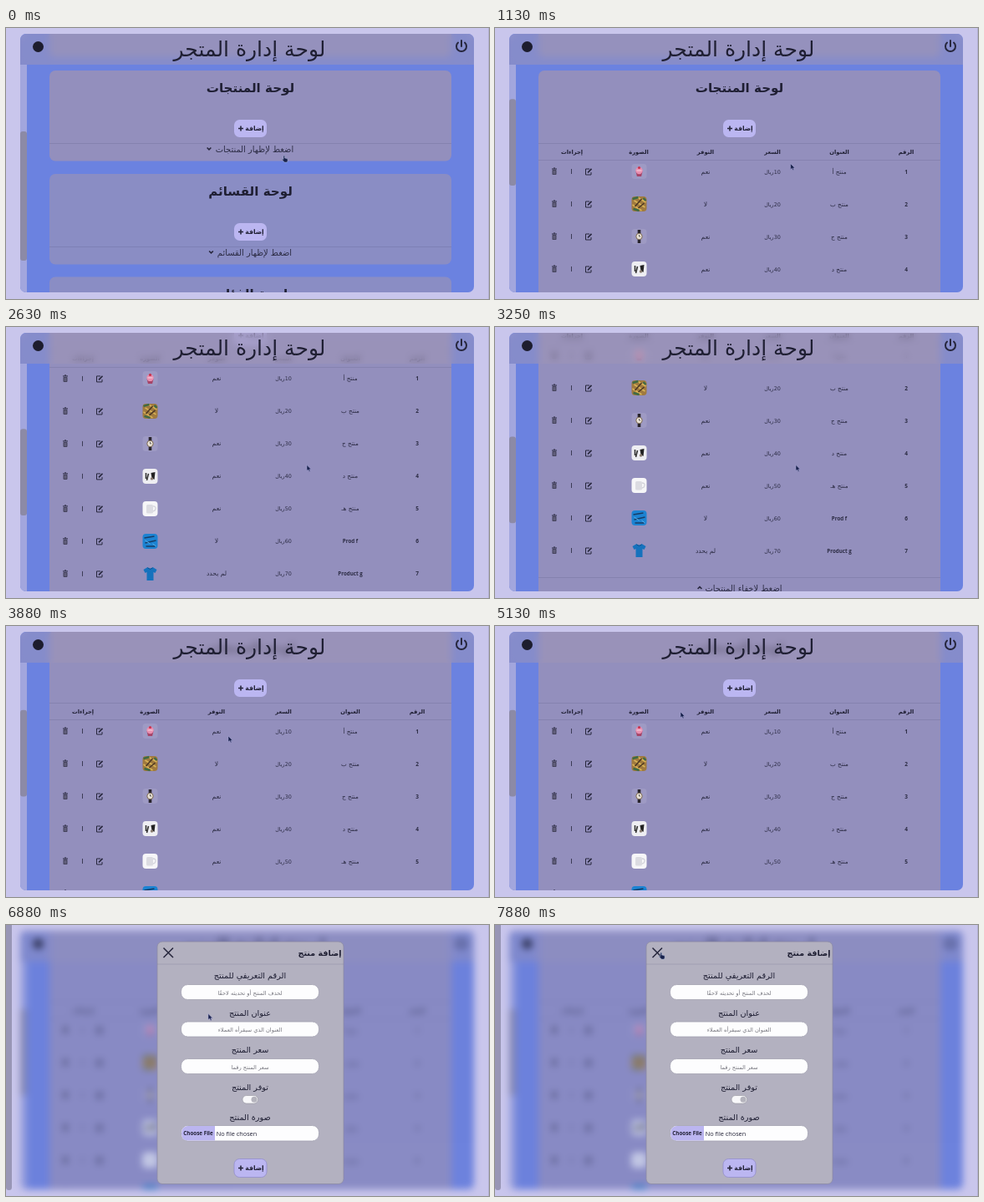
Animation of 578x325 px, one loop 8 s. Source, as an HTML page:

```html
<!DOCTYPE html>
<html lang="ar">
<head>
<meta charset="utf-8">
<style>
html, body { margin: 0; width: 100%; height: 100%; overflow: hidden; background: #c9c6ec; }
#stage { position: absolute; left: 0; top: 0; width: 578px; height: 325px; overflow: hidden; background: #c9c6ec; }
#page, #top { position: absolute; left: 0; top: 0; width: 578px; height: 325px; }
#panel { position: absolute; left: 17px; top: 7px; width: 543px; height: 310px; border-radius: 7px; overflow: hidden; background: #6b82e0; }
#panel svg { position: absolute; left: 0; top: 0; }
#header { position: absolute; left: 0; top: 0; width: 543px; height: 37px; background: rgba(160,150,182,.5); backdrop-filter: blur(4px); }
#tint { position: absolute; inset: 0; background: rgba(112,130,212,.3); }
#side { position: absolute; left: 0; top: 0; width: 7px; height: 318px; border-radius: 0 0 4px 4px; background: #9896b6; }
#edge { position: absolute; right: 0; top: 0; width: 1px; height: 325px; background: #b4b1d4; }
text { font-family: "DejaVu Sans", sans-serif; text-anchor: middle; direction: rtl; fill: #1f1f33; }
.b { font-weight: bold; }
.latin { font-family: "Open Sans", "Noto Sans", sans-serif; direction: ltr; }
.soft { fill: #2c2c44; }
.hint { fill: #77777f; }
.line { stroke: #3a3a60; stroke-opacity: .15; }
.ink { fill: none; stroke: #26263c; }
</style>
</head>
<body>
<div id="stage">
  <div id="page">
    <div id="panel">
      <svg id="list" width="543" height="310" viewBox="17 7 543 310"></svg>
      <div id="header"></div>
      <svg id="bar" width="543" height="310" viewBox="17 7 543 310"></svg>
      <div id="tint"></div>
    </div>
  </div>
  <div id="side"></div>
  <div id="edge"></div>
  <svg id="top" viewBox="0 0 578 325">
    <g id="modal"></g>
    <g id="cursor">
      <path id="arrow" d="M0 0V7L1.7 5.6 2.9 8 4.1 7.4 3 5.2H5.2Z" fill="#17204a" stroke="#a9a8d8" stroke-width=".5"/>
      <path id="hand" d="M0 .6Q.8-.4 1.6.6V3L5 3.8Q5.6 6.5 4.4 8H1.2L-1.8 4.6Q-1 3.6 0 4.6Z" fill="#17204a" stroke="#a9b8d8" stroke-width=".5"/>
    </g>
  </svg>
</div>
<script>
const $ = id => document.getElementById(id);
const text = (x, y, size, str, cls = '') =>
  `<text x="${x}" y="${y}" font-size="${size}" class="${cls}">${str}</text>`;
const rect = (x, y, w, h, r, fill, extra = '') =>
  `<rect x="${x}" y="${y}" width="${w}" height="${h}" rx="${r}" fill="${fill}" ${extra}/>`;
const line = y => `<path class="line" d="M52 ${y}H533"/>`;
const path = (d, width = 1, extra = '') => `<path class="ink" d="${d}" stroke-width="${width}" ${extra}/>`;
const at = (x, y, body) => `<g transform="translate(${x} ${y})">${body}</g>`;

const addButton = (y, h, extra = '') =>
  rect(273, y - h / 2, 39, h, 6.5, '#bbb6f1', extra) +
  path(`M278 ${y}h6M281 ${y - 3}v6`, 1.6) + text(297.5, y + 2.5, 7.6, 'إضافة', 'b');

const cardHead = (y, title) => text(292.5, y + 25.5, 15.1, title, 'b') + addButton(y + 69.5, 21);
const cardRect = (y, h, alpha, extra = '') => rect(52, y, 481, h, 7, `rgba(190,157,150,${alpha})`, extra);
const chevron = (x, y, dir) => path(`M${x - 2.4} ${y - dir}l2.4 ${2.4 * dir} 2.4 ${-2.4 * dir}`, 1.5);

// Thumbnails are drawn around their own centre
const white = rect(-9, -9, 18, 18, 4, '#eeeef2');
const faint = rect(-9, -9, 18, 18, 4, 'rgba(255,255,255,.1)');
const pics = [
  faint + '<path d="M-4 0H4L2.6 6H-2.6Z" fill="#a64468"/><circle cy="-1" r="4.2" fill="#e88fb0"/><circle cy="-4.5" r="1.6" fill="#c73550"/><path d="M-3-1H3" stroke="#f6d3df"/>',
  rect(-9, -9, 18, 18, 4, '#a07a3e') + '<path d="M-8 1L3 8M-6-4L7 4M-2-8L8-2" stroke="#d8b356" stroke-width="1.6"/><path d="M-8-6L-1-8M-7 6L0 8M5-7L8-4" stroke="#3e6a44" stroke-width="2.4"/><path d="M-5 3L3-6M-1 5L6-1" stroke="#4d3824" stroke-width="1.6"/>',
  faint + '<path d="M0-8V8" stroke="#28242c" stroke-width="3.6"/><circle r="3.7" fill="#e9e2d6" stroke="#7b6854"/><path d="M0-2V0H1.6" stroke="#333" stroke-width=".7" fill="none"/>',
  white + '<path d="M-5-4V3M-2-3L-4 5" stroke="#333" stroke-width="1.6"/><path d="M1-4L6-5 5 4 2 2Z" fill="#222"/><circle cx="2" cy="3" r="1.7" fill="#8a7c70"/>',
  rect(-9, -9, 18, 18, 4, '#f6f6f8') + rect(-4.5, -5, 8, 10.5, 1.5, '#dcdce2') + '<path d="M3.5-3Q7-3 6.5 0T3.5 3" fill="none" stroke="#d3d3da" stroke-width="1.3"/>',
  rect(-9, -9, 18, 18, 4, '#1c83d2') + '<path d="M-7-4L5-6M-6 2L7-1M-5 6H6" stroke="#173c66" stroke-width="1.5"/><path d="M-6-1L0 3M3 3L7 6" stroke="#58b1e8"/>',
  '<path d="M-3-8Q0-5 3-8L8-5 6-1 4-2V8H-4V-2L-6-1-8-5Z" fill="#1672bd"/><path d="M-3-7Q0-4 3-7" fill="none" stroke="#0d5391"/>'
];

const names = ['منتج أ', 'منتج ب', 'منتج ج', 'منتج د', 'منتج هـ', 'Prod f', 'Product g'];
const stock = ['نعم', 'لا', 'نعم', 'نعم', 'نعم', 'لا', 'لم يحدد'];
const trash = path('M-3-3H3M-1-4H1', 1) + rect(-2.5, -2, 5, 6, .8, '#45435c') +
  '<path d="M-.8-1V3M.8-1V3" stroke="#8c89aa" stroke-width=".6"/>';
const edit = path('M1-3H-3.5V4H3V1', 1) + path('M-1 1.5L3.5-3.2', 1.7);

const row = (name, i) => {
  const y = 172 + 39 * i, base = y + 2.5;
  return text(492, base, 6.5, i + 1, 'latin b soft') +
    text(412, base, i > 4 ? 6.2 : 7.2, name, i > 4 ? 'latin b soft' : 'soft') +
    text(332, base, 6.4, `${i + 1}0ريال`, 'soft') +
    text(252, base, 7.6, stock[i], 'soft') +
    at(172.5, y, pics[i]) + at(112, y, edit) + at(71, y, trash) + path(`M91.5 ${y - 3}v6`, .8);
};

const heads = ['الرقم', 'العنوان', 'السعر', 'التوفر', 'الصورة', 'إجراءات'];
const table = line(138.5) + heads.map((h, i) => text(492 - 80 * i, 150.5, 6.7, h, 'b')).join('') +
  line(158.5) + names.map(row).join('');

$('list').innerHTML = `
  <clipPath id="open"><rect id="openBox" x="52" y="138" width="481"/></clipPath>
  <g id="scroll">
    ${cardRect(-73, 108, .38)}
    ${cardRect(51, 108.5, .48, 'id="card"')}${cardHead(51, 'لوحة المنتجات')}
    <g clip-path="url(#open)">${table}</g>
    <g id="footLine">${line(138.5)}</g>
    <g id="foot">
      <g id="show">${text(297.5, 149, 9.9, 'اضغط لإظهار المنتجات', 'soft')}${chevron(243, 144.5, 1)}</g>
      <g id="hide">${text(297.5, 149, 9.9, 'اضغط لإخفاء المنتجات', 'soft')}${chevron(245, 145, -1)}</g>
    </g>
    <g id="rest">
      ${cardRect(175, 108.5, .38)}${cardHead(175, 'لوحة القسائم')}${line(262.5)}
      ${text(297.5, 273, 9.9, 'اضغط لإظهار القسائم', 'soft')}${chevron(245.5, 268.5, 1)}
      ${cardRect(298.5, 108.5, .38)}${cardHead(298.5, 'لوحة الفئات')}
    </g>
  </g>`;

$('bar').innerHTML = rect(17, 44, 8, 273, 0, '#a2a6dd') + rect(17, 0, 8, 0, 3, '#8c8aa6', 'id="thumb"') +
  text(291.5, 34, 25, 'لوحة إدارة المتجر') +
  '<circle cx="38.5" cy="22.5" r="6.5" fill="#1d1d2e"/>' +
  path('M541 17.6A6 6 0 1 0 549 17.6M545 15V22', 2, 'stroke-linecap="round"');

const field = (y, label, hint) => text(292, y - 16.5, 9.7, label) +
  rect(209.5, y - 9, 165, 18, 8, '#fdfdfe', 'stroke="#a2a1b0" stroke-width=".8"') +
  text(292, y + 3, 6.7, hint, 'hint');

$('modal').innerHTML =
  rect(181, 20, 223, 290.5, 6, '#b3b1c0', 'stroke="#8d8ca4" stroke-width=".8"') +
  text(375.5, 37, 9.5, 'إضافة منتج', 'b') +
  '<path class="line" d="M181 47H404"/>' + path('M188.5 27.5l11.5 11.5m0-11.5l-11.5 11.5', 1.5) +
  field(80.5, 'الرقم التعريفي للمنتج', 'لحذف المنتج أو تحديثه لاحقًا') +
  field(125, 'عنوان المنتج', 'العنوان الذي سيقرأه العملاء') +
  field(169.5, 'سعر المنتج', 'سعر المنتج رقما') +
  text(292, 198, 9.7, 'توفر المنتج') +
  rect(283, 204.5, 18.5, 9.5, 4.7, '#f8f8fa', 'stroke="#98979f" stroke-width=".6"') +
  '<circle cx="297" cy="209.2" r="3.5" fill="#b5b4bd"/>' +
  text(292, 234, 9.7, 'صورة المنتج') +
  rect(209.5, 240.5, 165, 18.5, 8, '#fdfdfe', 'stroke="#a2a1b0" stroke-width=".8"') +
  '<path d="M250 241V258.500H217Q210 258 210 250T217 241Z" fill="#bbb5f0"/>' +
  text(230, 252.3, 6.3, 'Choose File', 'latin b') + text(276, 252.5, 7.3, 'No file chosen', 'latin') +
  addButton(291.5, 22, 'stroke="#8f89cc" stroke-width=".7"');

const clamp = v => Math.max(0, Math.min(1, v));
const smooth = v => v * v * (3 - 2 * v);
const out = v => 1 - (1 - v) ** 2;

// Eased value between [time, value] stops
function track(t, stops) {
  let [t0, v0] = stops[0];
  for (const [t1, v1] of stops) {
    if (t < t1) return v0 + (v1 - v0) * smooth(clamp((t - t0) / (t1 - t0)));
    [t0, v0] = [t1, v1];
  }
  return v0;
}

const scrollStops = [[1800, 0], [2130, 40], [2850, 130], [3200, 138], [3420, 138], [3860, 46]];
const pointer = [
  [300, 332, 153], [1500, 360, 165.5], [3400, 360, 165.5], [3880, 266, 132], [4700, 222, 103],
  [5250, 222, 103], [5650, 292, 73], [5900, 292, 73], [6130, 242, 106.5], [6900, 242, 106.5],
  [7700, 198, 33]
];
const xStops = pointer.map(p => [p[0], p[1]]);
const yStops = pointer.map(p => [p[0], p[2]]);
const MODAL = 5937, GROW = 306;

const shift = (id, x, y) => $(id).setAttribute('transform', `translate(${x} ${y})`);
const show = (id, on) => $(id).style.display = on ? '' : 'none';
const size = (id, h) => $(id).setAttribute('height', h);

function draw(now) {
  const t = now % 8000;
  const p = smooth(clamp((t - 200) / 350));
  const s = track(t, scrollStops), total = 620 + GROW * p;

  shift('scroll', 0, -s);
  size('openBox', 300 * p);
  size('card', 108.5 + GROW * p);
  shift('footLine', 0, 300 * p);
  shift('foot', 0, GROW * p);
  shift('rest', 0, GROW * p);
  show('show', t < 200);
  show('hide', t >= 200);
  $('thumb').setAttribute('y', 7 + (234 + s) * 310 / total);
  size('thumb', 310 * 310 / total);

  const fade = clamp((t - MODAL) / 150);
  shift('modal', 0, -50 * (1 - out(clamp((t - MODAL) / 300))));
  for (const id of ['modal', 'tint', 'side']) $(id).style.opacity = fade;
  $('page').style.filter = fade ? `blur(${4 * fade}px)` : 'none';

  const hand = t < 500 || (t > 5550 && t < 5960) || t > 7600;
  show('hand', hand);
  show('arrow', !hand);
  shift('cursor', track(t, xStops), track(t, yStops));
}

const start = performance.now();
function tick() {
  draw(performance.now() - start);
  requestAnimationFrame(tick);
}
tick();
</script>
</body>
</html>
```
